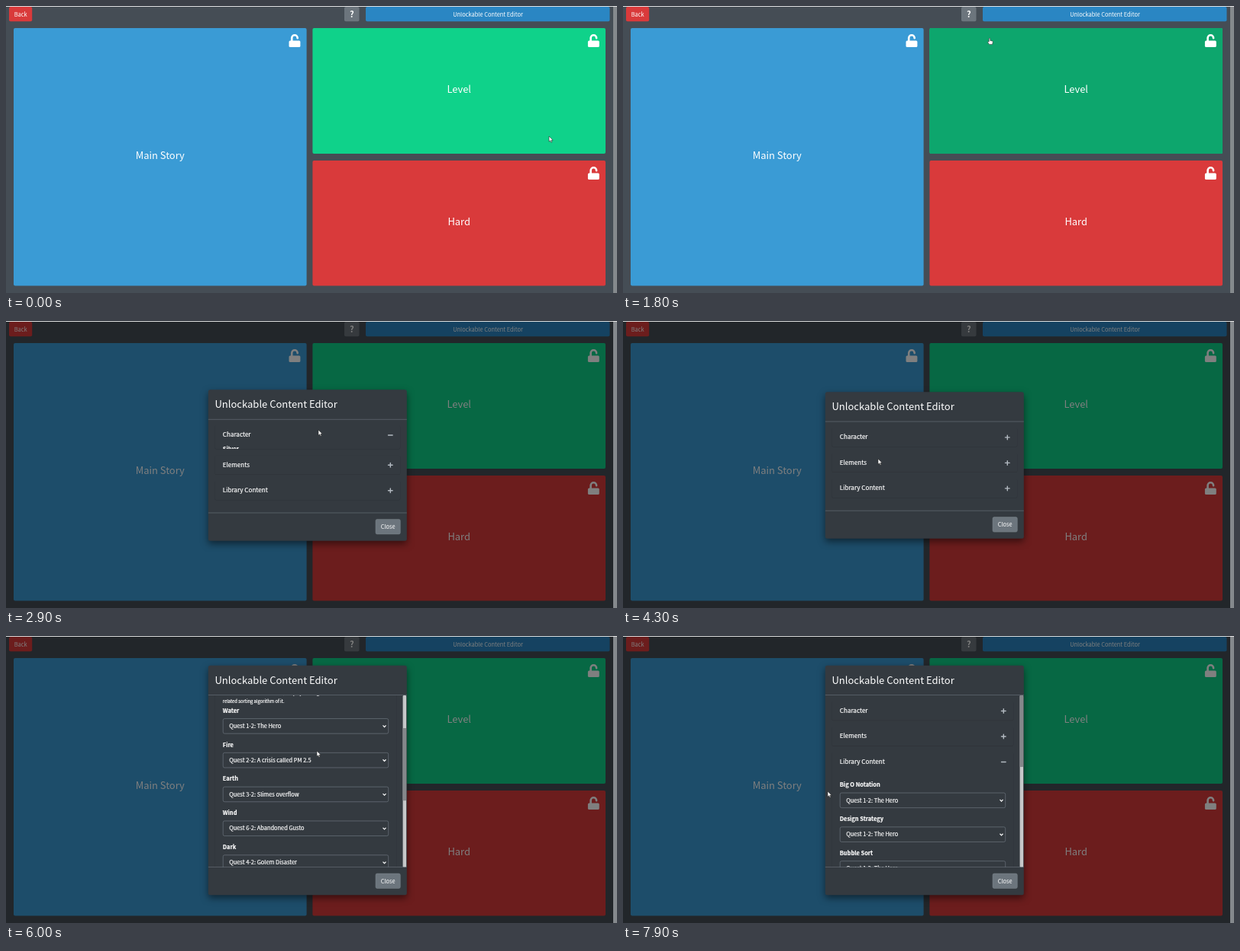
Write an HTML page that moves like this. It is 800 px wide and 377 px high and loops after 8 s.

```html
<!DOCTYPE html>
<html lang="en">
<head>
<meta charset="utf-8">
<title>Unlockable Content Editor</title>
<style>
html, body { margin: 0; width: 100%; height: 100%; overflow: hidden; background: #454d55; }
svg { display: block; }
#stage { width: 100%; height: 100%; }
text { font-family: 'Noto Sans CJK JP', 'Noto Sans CJK SC', 'Noto Sans CJK', sans-serif; fill: #fff; white-space: pre; }
#modal > rect:first-child { filter: drop-shadow(0 4px 5px rgba(0, 0, 0, .5)); }
#modal svg text { stroke: #fff; stroke-width: .2px; }
</style>
</head>
<body>
<svg id="stage" viewBox="0 0 800 377"></svg>
<script>
const LOOP = 8000;
const GREY = '#6c757d', PANEL = '#343a40', RED = '#d93a3b', LINE = '#636c74';
const BASE = 7.45;

const stage = document.getElementById('stage');

function add(parent, tag, attrs = {}) {
  const node = document.createElementNS('http://www.w3.org/2000/svg', tag);
  set(node, attrs);
  return parent.appendChild(node);
}
function set(node, attrs) {
  for (const key in attrs) node.setAttribute(key, attrs[key]);
}
function rect(parent, x, y, width, height, fill, more = {}) {
  return add(parent, 'rect', { x, y, width, height, fill, ...more });
}
function text(parent, str, x, y, size, more = {}) {
  const node = add(parent, 'text', { x, y, 'font-size': size, ...more });
  node.textContent = str;
  return node;
}
const middle = { 'text-anchor': 'middle' };
const bold = { 'font-weight': 700 };

// --- page behind the dialog ---
function unlockIcon(x, y) {
  const g = add(stage, 'g', { transform: `translate(${x} ${y})` });
  rect(g, 0, 8.4, 14.9, 8.6, '#fff', { rx: 1.6 });
  add(g, 'path', {
    d: 'M3.7 9V5a3.7 3.7 0 0 1 7.5 0V5.2', fill: 'none', stroke: '#fff',
    'stroke-width': 2.6, 'stroke-linecap': 'round'
  });
}
function tile(label, x, y, h, fill, labelY, hoverFill) {
  rect(stage, x, y, 383.6, h, fill, { rx: 2 });
  const hover = hoverFill && rect(stage, x, y, 383.6, h, hoverFill, { rx: 2 });
  text(stage, label, x + 191.8, labelY, 12.9, middle);
  unlockIcon(x + 360.5, y + 8);
  return hover;
}

rect(stage, 0, 0, 800, 377, '#454d55');
rect(stage, 4, 1, 30.2, 19.2, RED, { rx: 2 });
text(stage, 'Back', 19.2, 13.6, BASE, middle);
rect(stage, 443, 1, 19.5, 19.2, GREY, { rx: 2 });
text(stage, '?', 452.8, 15, 11, { ...middle, 'font-weight': 900 });
rect(stage, 471, 1, 319.5, 19.2, '#2a86c3', { rx: 2 });
text(stage, 'Unlockable Content Editor', 631, 13.6, BASE, middle);

tile('Main Story', 10, 29, 338.5, '#3a9bd5', 201);
const levelHover = tile('Level', 401.4, 29, 165, '#0fd28a', 114.2, '#0da66d');
tile('Hard', 401.4, 203, 164.5, RED, 287.8);

const backdrop = rect(stage, 0, 0, 800, 377, '#000');
rect(stage, 795, 0, 5, 377, '#85898d');
rect(stage, 0, 0, 800, .9, '#f0f0f0');

// --- dialog ---
const HEAD = 38.5, FOOT = 37, MAX_BODY = 226, LEFT = 264.8, WIDTH = 260;
const CARD = 25.2, GAP = 8.3, FIELD = 44.8;

const modal = add(stage, 'g', { id: 'modal' });
const frame = rect(modal, LEFT, 0, WIDTH, 0, PANEL, { rx: 2.5 });
text(modal, 'Unlockable Content Editor', 273.5, 24, 13);
rect(modal, LEFT, HEAD, WIDTH, .7, LINE);
const body = add(modal, 'svg', { x: LEFT, y: HEAD + .7, width: WIDTH });
const content = add(body, 'g');
const bar = add(body, 'g');
rect(bar, 254.8, 0, 4.6, MAX_BODY, '#c6c8c9', { rx: 1.5 });
const thumb = rect(bar, 254.8, 0, 4.6, 0, '#85888b', { rx: 1 });
const foot = add(modal, 'g');
rect(foot, LEFT, 0, WIDTH, .7, LINE);
rect(foot, 484, 8.8, 32.3, 19.5, GREY, { rx: 2, stroke: '#7d868d', 'stroke-width': .5 });
text(foot, 'Close', 500.2, 21.3, BASE, middle);

const HERO = 'Quest 1-2: The Hero';
const cards = [
  {
    title: 'Character', height: 235, top: 6.5, notes: [],
    fields: [
      ['Silver', HERO], ['Flare', 'Quest 2-2: A crisis called PM 2.5'],
      ['Terra', 'Quest 3-2: Slimes overflow'], ['Gale', 'Quest 6-2: Abandoned Gusto'],
      ['Shade', 'Quest 4-2: Golem Disaster']
    ]
  },
  {
    title: 'Elements', height: 419, top: 55.9,
    notes: [
      'The element stays locked until its quest is completed.',
      'When an element is unlocked, the player also gets the',
      'related sorting algorithm of it.'
    ],
    fields: [
      ['Water', HERO], ['Fire', 'Quest 2-2: A crisis called PM 2.5'],
      ['Earth', 'Quest 3-2: Slimes overflow'], ['Wind', 'Quest 6-2: Abandoned Gusto'],
      ['Dark', 'Quest 4-2: Golem Disaster'], ['Light', HERO], ['Ice', HERO], ['Thunder', HERO]
    ]
  },
  {
    title: 'Library Content', height: 426, top: 17.9, notes: [],
    fields: ['Big O Notation', 'Design Strategy', 'Bubble Sort', 'Selection Sort', 'Insertion Sort',
      'Merge Sort', 'Quick Sort', 'Heap Sort', 'Radix Sort'].map(name => [name, HERO])
  }
];

for (const card of cards) {
  card.g = add(content, 'g');
  card.shade = rect(card.g, 8.6, .5, 0, CARD, '#2c3136', { rx: 2 });
  card.face = rect(card.g, 8.6, 0, 0, CARD, PANEL, { rx: 2 });
  text(card.g, card.title, 19, 15.4, 8.1);
  card.icon = add(card.g, 'path', { stroke: '#b3bac1', 'stroke-width': 1.4, 'stroke-linecap': 'round' });
  card.panel = add(card.g, 'svg', { y: CARD, width: WIDTH });
  card.notes.forEach((line, i, all) =>
    text(card.panel, line, 19, card.top - 10 - (all.length - 1 - i) * 11.5, 5.8));
  card.selects = card.fields.map(([label, value], i) => {
    const y = card.top + i * FIELD;
    text(card.panel, label, 19, y + 2.7, BASE, bold);
    const box = rect(card.panel, 19.4, y + 10.5, 0, 19.6, PANEL, { rx: 2, stroke: GREY, 'stroke-width': .7 });
    text(card.panel, value, 27.4, y + 23, BASE);
    const arrow = add(card.panel, 'path', { d: 'M-2 -1L0 1.1L2 -1', fill: 'none', stroke: '#fff', 'stroke-width': 1.2 });
    return { box, arrow, y: y + 20.4 };
  });
}

// --- pointer ---
const ink = { fill: '#fff', stroke: '#222', 'stroke-width': .55, 'stroke-linejoin': 'round' };
const arrow = add(stage, 'path', { d: 'M0 0V7.2L1.7 5.7L2.8 8.2L4 7.7L2.9 5.3H5.1Z', ...ink });
const hand = add(stage, 'path', {
  d: 'M-.8 5V.7Q0 -.5 .8 .7V3.4L3.6 4Q4.4 4.3 4.3 5.2L3.7 8.4H-.5L-2.5 5.4Q-2.2 4.2 -.8 5Z', ...ink
});

// --- motion ---
const clamp = v => Math.min(1, Math.max(0, v));
const ramp = (t, from, span) => clamp((t - from) / span);
const smooth = p => p * p * (3 - 2 * p);

function bezier(x1, y1, x2, y2) {
  const at = (a, b, u) => 3 * a * u * (1 - u) ** 2 + 3 * b * u * u * (1 - u) + u ** 3;
  return p => {
    let lo = 0, hi = 1;
    for (let i = 0; i < 24; i++) {
      const mid = (lo + hi) / 2;
      if (at(x1, x2, mid) < p) lo = mid; else hi = mid;
    }
    return p <= 0 ? 0 : p >= 1 ? 1 : at(y1, y2, lo);
  };
}
const ease = bezier(.25, .1, .25, 1);
const easeOut = bezier(0, 0, .58, 1);

function track(keys, t) {
  const i = keys.findIndex(k => k[0] > t);
  if (i < 0) return keys[keys.length - 1].slice(1);
  if (i === 0) return keys[0].slice(1);
  const a = keys[i - 1], b = keys[i];
  const p = smooth((t - a[0]) / (b[0] - a[0]));
  return a.slice(1).map((v, j) => v + (b[j + 1] - v) * p);
}

const OPEN_AT = 2050;
const pointerPath = [
  [0, 711, 171], [1150, 711, 171], [1800, 480, 42], [2000, 492, 13], [2150, 492, 13],
  [2800, 409, 143], [2950, 409, 143], [3300, 420, 168], [3500, 420, 168], [3800, 400, 98],
  [3930, 398, 98], [4300, 334, 181], [4480, 334, 184], [4900, 407, 151], [6050, 407, 151],
  [6600, 390, 131], [6780, 390, 131], [7100, 345, 205], [7300, 338, 217], [7480, 338, 217],
  [7800, 268, 204]
];
const scrollPath = [
  [3230, 0], [3420, 126], [3500, 126], [3700, 0],
  [4980, 0], [5480, 310], [5600, 310], [6000, 102], [6350, 0]
];
// opening and closing click of each card
const clicks = [[2887, 3880], [4440, 6770], [7430, Infinity]];

function layout(t) {
  const open = clicks.map(([on, off]) => t < off ? ease(ramp(t, on, 350)) : 1 - ease(ramp(t, off, 350)));
  const heights = cards.map((card, i) => card.height * open[i]);
  const total = 117.1 + heights.reduce((a, b) => a + b);
  const bodyH = Math.min(MAX_BODY, total);
  const scrolls = total > MAX_BODY + .01;
  const right = scrolls ? 246.5 : 251.5;
  const scroll = Math.min(track(scrollPath, t)[0], total - bodyH);

  let y = GAP - .8;
  cards.forEach((card, i) => {
    const h = heights[i];
    set(card.g, { transform: `translate(0 ${y})` });
    set(card.shade, { width: right - 8.6, height: CARD + h });
    set(card.face, { width: right - 8.6, height: CARD + h });
    const expanded = t >= clicks[i][0] && t < clicks[i][1];
    const x = right - 13;
    set(card.icon, { d: `M${x - 2.8} 13h5.6` + (expanded ? '' : `M${x} 10.2v5.6`) });
    set(card.panel, { height: Math.max(h, .001), visibility: h > .05 ? 'visible' : 'hidden' });
    for (const s of card.selects) {
      set(s.box, { width: right - 30 });
      set(s.arrow, { transform: `translate(${right - 15.8} ${s.y})` });
    }
    y += CARD + GAP + h;
  });

  const full = HEAD + bodyH + FOOT;
  const drop = -50 * (1 - easeOut(ramp(t, OPEN_AT, 300)));
  set(modal, {
    transform: `translate(0 ${189.5 - full / 2 + drop})`,
    opacity: ramp(t, OPEN_AT, 150),
    visibility: t > OPEN_AT ? 'visible' : 'hidden'
  });
  set(frame, { height: full });
  set(body, { height: bodyH });
  set(content, { transform: `translate(0 ${-scroll})` });
  set(bar, { opacity: scrolls ? 1 : 0 });
  set(thumb, { y: scroll * bodyH / total, height: bodyH * bodyH / total });
  set(foot, { transform: `translate(0 ${HEAD + bodyH})` });
}

function render(t) {
  set(levelHover, { opacity: ramp(t, 80, 200) * (1 - ramp(t, 1920, 150)) });
  set(backdrop, { opacity: .5 * ramp(t, OPEN_AT, 150) });
  layout(t);

  const [x, y] = track(pointerPath, t);
  const pointing = t > 80 && t < 2120;
  set(arrow, { transform: `translate(${x} ${y})`, opacity: pointing ? 0 : 1 });
  set(hand, { transform: `translate(${x} ${y})`, opacity: pointing ? 1 : 0 });
}

const start = performance.now();
function tick() {
  render((performance.now() - start) % LOOP);
  requestAnimationFrame(tick);
}
render(0);
requestAnimationFrame(tick);
</script>
</body>
</html>
```
